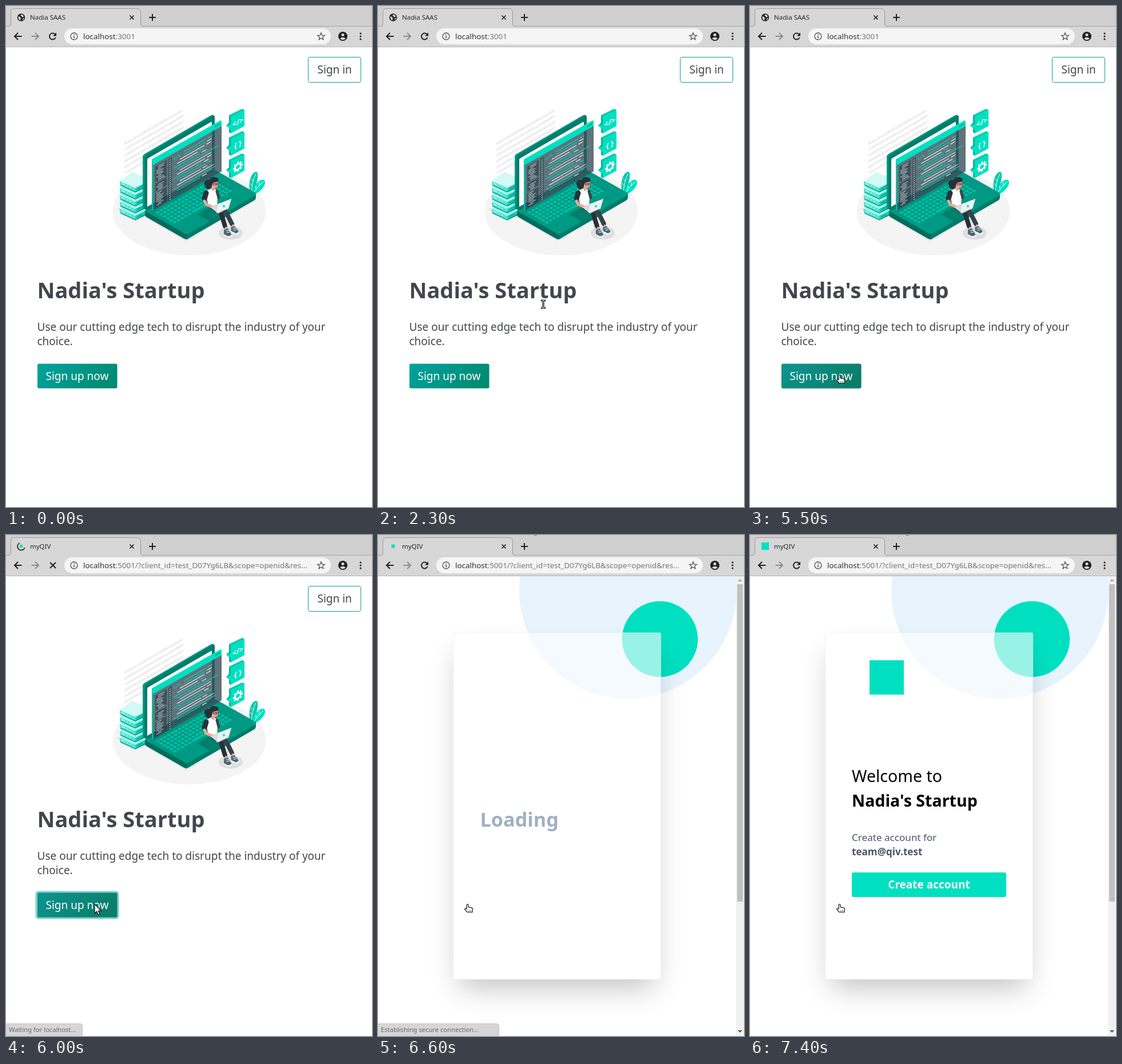
Recreate the animation shown at these times as an HTML page with a canvas. Size 640 by 876 pixels, loop 8000 ms.

```html
<!DOCTYPE html>
<html lang="en">
<head>
<meta charset="utf-8">
<title>Sign up flow</title>
<style>
  html, body { margin: 0; width: 100%; height: 100%; overflow: hidden; background: #fff; }
  canvas { display: block; width: 640px; height: 876px; }
</style>
</head>
<body>
<canvas id="stage" width="640" height="876"></canvas>
<script>
const LOOP = 8000, W = 640, H = 876;
const TEAL = '#00e0c1', INK = '#43464c', FONT = '"Noto Sans", "Open Sans", sans-serif';
const screen2d = document.getElementById('stage').getContext('2d');
let g = screen2d;

// ---------- helpers ----------
function fill(color, path) {
  g.fillStyle = color;
  g.fill(typeof path === 'string' ? new Path2D(path) : path);
}
function line(color, width, d) {
  g.strokeStyle = color;
  g.lineWidth = width;
  g.stroke(new Path2D(d));
}
function rect(color, x, y, w, h) {
  g.fillStyle = color;
  g.fillRect(x, y, w, h);
}
function box(x, y, w, h, r) {
  const p = new Path2D();
  p.roundRect(x, y, w, h, r);
  return p;
}
function oval(color, x, y, rx, ry = rx) {
  const p = new Path2D();
  p.ellipse(x, y, rx, ry, 0, 0, 7);
  fill(color, p);
}
function ring(color, width, x, y, r, from = 0, to = 2 * Math.PI) {
  g.strokeStyle = color;
  g.lineWidth = width;
  g.beginPath();
  g.arc(x, y, r, from, to);
  g.stroke();
}
function text(str, x, y, size, color, weight = 400, align = 'left') {
  g.font = `${weight} ${size}px ${FONT}`;
  g.textAlign = align;
  g.fillStyle = color;
  g.fillText(str, x, y);
  return g.measureText(str).width;
}
function plane(a, b, c, d, x, y, draw) {
  g.save();
  g.transform(a, b, c, d, x, y);
  draw();
  g.restore();
}
function seeded(s) {
  return () => (s = (s * 16807) % 2147483647) / 2147483647;
}

// ---------- illustration ----------
function binaryRows() {
  const rnd = seeded(41);
  for (let row = 0; row < 6; row++) {
    plane(1, -0.577, 0, 1, 207, 243 + row * 10.3, () => {
      let bits = '';
      for (let i = 0; i < 33; i++) bits += rnd() < 0.5 ? '0' : '1';
      g.font = 'italic 5.8px "Liberation Sans", sans-serif';
      g.fillStyle = '#c4c4c4';
      g.fillText(bits, 0, 0);
    });
  }
}

function servers() {
  fill('#e3e3e3', 'M193 355L224 374L246 362V340Z');
  for (let i = 4; i >= 0; i--) {
    plane(1, 0, 0, 1, 0, 306 + i * 12.2, () => {
      fill('#009681', 'M200 4L226 17L247 6V10L226 20L200 8Z');
      fill('#4fe6d3', 'M199 0L226 12V18.5L199 6Z');
      fill('#1ed2ba', 'M226 12L247 1V7L226 18.5Z');
      fill(i ? '#a9f4ea' : '#d3f9f4', 'M199 0L221 -16L247 -4V1L226 12Z');
      line('#fff', 1, 'M202 4L208 6.8M211 8.2L213 9.1M216 10.4L218 11.3');
      line('#007d6c', 1, 'M229 14L239 8.8');
    });
  }
}

function codeWindow() {
  fill('rgba(55,80,90,.8)', 'M257 276L377 208V289L257 358Z');
  fill('#00bfa5', 'M255 268L257.5 270V358L255 356.5Z');
  fill(TEAL, 'M255 268L375 200L377 201V210L257 278Z');
  for (let i = 0; i < 3; i++) oval('#00705f', 367 + i * 3.2, 210.3 - i * 1.85, 1.1);

  const rnd = seeded(97);
  plane(1, -0.57, 0, 1, 257, 278, () => {
    const panel = 'rgba(35,55,65,.55)';
    rect(panel, 4, 5, 20, 27);
    rect(panel, 4, 35, 20, 14);
    rect(panel, 4, 52, 20, 25);
    rect(panel, 27, 5, 6, 73);
    for (let y = 7; y < 76; y += 2.9) {
      if ((y > 31 && y < 36) || (y > 48 && y < 53)) continue;
      rect('#d5e0e2', 6 + (rnd() < 0.3 ? 3 : 0), y, 7 + rnd() * 6, 1);
    }
    for (let y = 8; y < 77; y += 3.6) rect('#b4c3c7', 28.5, y, 3, 1.3);
    g.font = '700 8px "Noto Sans Mono", monospace';
    g.fillStyle = TEAL;
    g.fillText('</>', 35, 13);
    for (let i = 0; i < 14; i++) {
      const y = 7 + i * 4.7, indent = i < 2 ? 54 : 36 + [0, 6, 11, 6][i % 4];
      const len = Math.min(34 + rnd() * 46, 114 - indent);
      rect(i % 4 < 2 ? TEAL : '#ffffff', indent, y, len, 1.2);
      if (indent + len < 100) rect(i % 3 ? '#ffffff' : TEAL, indent + len + 3, y, 8, 1.2);
    }
  });
}

function laptop() {
  fill('#e5e5e5', 'M246 371L314 411L334 403L318 396Z');
  // base
  fill('#006d5d', 'M243 358L316 398V408Q313 408 310 406L247 370Q243 368 243 364Z');
  fill('#007c69', 'M316 398L437 329V335Q437 338 434 340L320 406Q318 408 316 408Z');
  fill('#009a84', 'M243 358L366 287L437 327Q438 329 436 331L319 398Q316 400 313 398Z');
  fill('#008772', 'M259 361L362 302L398 322L295 381Z');
  plane(1, -0.573, 1, 0.573, 259, 361, () => {
    for (let row = 0; row < 6; row++) {
      for (let col = 0; col < 16; col++) {
        if (row === 5 && col > 4 && col < 10) continue;
        rect('#00bda4', 0.6 + col * 6.4, 0.6 + row * 6, 5.2, 4.8);
      }
    }
    rect('#00bda4', 32.6, 30.6, 30.8, 4.8);
  });
  fill('#00806d', 'M334 364L362 348L386 362L358 378Z');
  // lid
  fill('#007d6b', 'M239 264Q239 261 242 259L359 191Q364 189 365 194V289L247 358L239 353Z');
  fill('#009a85', 'M239 264Q239 261 242 259L359 191L361.5 192L245 260Q242 262 242 265V355L239 353Z');
  fill('#ffffff', 'M247 269Q247 267 249 266L358 203Q360 202 360 204V286L247 351Z');
  codeWindow();
}

function bubbles() {
  ['</>', '{ }', ''].forEach((label, i) => plane(1, 0, 0, 1, 0, i * 39, () => {
    fill('#00b59b', 'M390 191L413 180L417 182L393 194V223L390 221V213L385 209L390 204Z');
    fill('#00cdb1', 'M390 191L413 180L417 182L393 194Z');
    fill(TEAL, 'M393 194L417 182V210L393 223V216L386 210L393 206Z');
    plane(1, -0.52, 0, 1, 405.5, 203, () => {
      if (label) {
        text(label, 0, 4.5, 12.5, '#fff', 700, 'center');
        return;
      }
      ring('#fff', 3, 0, 0, 5);
      for (let k = 0; k < 8; k++) {
        g.save();
        g.rotate(k * Math.PI / 4);
        rect('#fff', -1.5, -8.6, 3, 3.4);
        g.restore();
      }
    });
  }));
}

function plant() {
  fill('#00c9ab', 'M427 326C423 311 427 294 436 290C443 288 441 306 432 327Z');
  fill(TEAL, 'M430 329C433 313 443 302 451 304C457 309 449 323 434 330Z');
  line('#fff', 0.9, 'M429 325Q431 306 437 293M427 310L431 315M429 302L433 307M432 328Q440 315 450 307M437 314L437 320M443 308L443 315');
}

function girl() {
  const dark = '#263238', skin = '#f2a493';
  oval('#dedede', 393, 397, 21, 11.5);
  // legs
  g.lineCap = g.lineJoin = 'round';
  line(dark, 8, 'M361 352L376 362L383 385');
  line('#34434b', 8, 'M367 350L385 361L395 381');
  line(skin, 4, 'M385 388L386 392M397 384L398 387');
  fill('#4a6977', 'M381 391L388 389L394 399Q394 404 388 403L381 399Z');
  fill('#4a6977', 'M393 387L400 385L406 393Q408 398 402 398L394 394Z');
  line('#fff', 2, 'M381 400L388 404L394 402M394 395L402 399L407 396');
  line('#fff', 1, 'M385 393L390 392M386 396L391 395M397 389L402 388M398 392L403 391');
  // body
  fill('#ffffff', 'M352 322Q360 317 367 321Q371 328 369 348L355 351Q350 339 352 322Z');
  line(dark, 9, 'M350 327L347 337');
  line(skin, 5, 'M347 341L350 347L365 353');
  line('#37474f', 5, 'M369 324L372 335');
  // hair and head
  fill(dark, 'M357 304C349 302 344 309 348 314C349 319 354 323 357 319Z');
  line(skin, 5, 'M362 315L362 321');
  oval(skin, 365, 311, 6.5, 8);
  fill(dark, 'M356 318C353 306 356 299 363 299C370 299 373 303 371 307C366 309 363 307 361 311L359 318Z');
  line(dark, 0.9, 'M363 310H367V313H363ZM368.5 310H371.5V313H368.5Z');
  line('#d8516a', 1, 'M366 317L369 316.5');
  g.lineCap = 'butt';
  g.lineJoin = 'miter';
  // small computer
  fill('#d5dada', 'M357 352L372 345L386 355L371 363Z');
  fill('#eef1f1', 'M371 346L394 337L389 354L368 362Z');
  line('#c4cccc', 0.8, 'M368 362L389 354L394 337');
  oval(TEAL, 381, 350, 2);
}

function buildArt() {
  const art = document.createElement('canvas');
  art.width = W;
  art.height = H;
  g = art.getContext('2d');
  oval('#f4f4f4', 320.5, 359, 134, 77);
  binaryRows();
  servers();
  plant();
  laptop();
  bubbles();
  girl();
  g = screen2d;
  return art;
}
const art = buildArt();

// ---------- browser frame ----------
function favicon(t) {
  if (t < 5900) {
    oval('#26292d', 26.5, 20, 6.8);
    fill('#d8d8d8', 'M21 18L25 19.5L26 23L24 25L22 22ZM27 14.5L31 17L30 20L27.5 18.5L25.5 16.5ZM29 22L32 21L30 25Z');
  } else if (t < 6600) {
    const a = t < 6200 ? -0.2 : 0.1;
    ring('#3b3f44', 2, 26.5, 20, 6.5, a + 0.5, a + 4.5);
    if (t >= 6000) rect(TEAL, 24, 17, 5, 5);
  } else if (t < 7000) rect(TEAL, 23.5, 16.5, 6, 6);
  else rect(TEAL, 20, 13, 13, 13);
}

function chrome(t) {
  const dark = '#202124';
  rect('#d0d0d0', 0, 0, W, 36);
  rect('#d7d7d7', 0, 36, W, 36);
  rect('#a3a3a3', 0, 35, W, 1);
  rect('#b4b4b4', 0, 71, W, 1);
  const tab = 'M0 35.5H4Q8.5 35.5 8.5 31V11Q8.5 4.5 15 4.5H228Q235.5 4.5 235.5 11V31Q235.5 35.5 240 35.5';
  fill('#d7d7d7', tab + 'V37H0Z');
  line('#999', 1, tab);
  if (t >= 6400) rect('#777', 273, 0, 5, 1);

  favicon(t);
  text(t < 6000 ? 'Nadia SAAS' : 'myQIV', 42, 24, 11.5, '#26282b');
  line(dark, 1.7, 'M216.5 16.5L223.5 23.5M223.5 16.5L216.5 23.5');
  line(dark, 2, 'M250 20H262M256 14V26');

  line(dark, 2, 'M27.5 53H15M21 47L15 53L21 59');
  line('#8b8b8b', 2, 'M44.5 53H57M51 47L57 53L51 59');
  if (t >= 5900 && t < 6600) {
    line(dark, 2, 'M77 48L87 58M87 48L77 58');
  } else {
    ring(dark, 2, 81.5, 53, 5.5, 0.4, 5.5);
    fill(dark, 'M88 46.5V52.5H82Z');
  }

  fill('#f5f5f5', box(102, 39, 466, 28, 14));
  ring('#55585c', 1.4, 119, 53, 6);
  rect('#55585c', 118.2, 52, 1.6, 4.5);
  rect('#55585c', 118.2, 49.3, 1.6, 1.6);
  const w = text('localhost', 135, 58, 13.4, '#2d2f32');
  const rest = t < 6000 ? ':3001' : ':5001/?client_id=test_D07Yg6LB&scope=openid&res...';
  text(rest, 135 + w, 58, 13.4, '#737578');

  let star = '';
  for (let i = 0; i < 10; i++) {
    const r = i % 2 ? 2.8 : 6.6, a = i * Math.PI / 5 - Math.PI / 2;
    star += (i ? 'L' : 'M') + (551 + r * Math.cos(a)) + ' ' + (53.5 + r * Math.sin(a));
  }
  line('#4c4f53', 1.3, star + 'Z');
  oval(dark, 589, 53, 8);
  oval('#d7d7d7', 589, 50.5, 2.5);
  fill('#d7d7d7', 'M584 57Q589 52.5 594 57Q589 61.5 584 57Z');
  for (let y = 48; y <= 58; y += 5) oval(dark, 620, y, 1.6);
}

function statusBar(t) {
  if (t < 5700 || t >= 7200) return;
  const early = t < 6400, w = early ? 134 : 212;
  const p = box(-2, 854.5, w + 1.5, 24, 4);
  fill('#d6d6d6', p);
  g.strokeStyle = '#c4c4c4';
  g.lineWidth = 1;
  g.stroke(p);
  text(early ? 'Waiting for localhost...' : 'Establishing secure connection...', 5, 869, 11.2, '#666');
}

// ---------- pages ----------
function landing(t) {
  g.drawImage(art, 0, 0);
  g.strokeStyle = '#0f9d8c';
  g.lineWidth = 1;
  g.stroke(box(528.5, 89.5, 92, 44, 3));
  text('Sign in', 544.5, 118, 19, INK);
  text("Nadia's Startup", 54.5, 511, 38, INK, 700);
  text('Use our cutting edge tech to disrupt the industry of your', 54.5, 568, 19, INK);
  text('choice.', 54.5, 593, 19, INK);

  const hover = t >= 5500, button = box(55, 625.6, 139.5, 42.8, 3);
  if (t >= 5900) fill('#7ed2cf', box(51.5, 622.5, 146, 49, 5));
  const shade = g.createLinearGradient(79, 602, 170, 692);
  shade.addColorStop(0, hover ? '#0d9490' : '#00a3a0');
  shade.addColorStop(1, hover ? '#0b7b65' : '#00886b');
  g.save();
  if (hover && t < 5900) {
    g.shadowColor = 'rgba(0,0,0,.18)';
    g.shadowBlur = 3;
    g.shadowOffsetY = 1;
  }
  fill(shade, button);
  g.restore();
  text('Sign up now', 69.5, 654, 19, '#fff');
}

function card() {
  const p = box(131.5, 171, 363, 606, 2);
  const outside = new Path2D('M0 72H626V876H0Z');
  outside.addPath(p);
  g.save();
  g.clip(outside, 'evenodd');
  g.shadowColor = 'rgba(0,0,0,.25)';
  g.shadowBlur = 50;
  g.shadowOffsetY = 25;
  fill('#000', box(143.5, 183, 339, 582, 2));
  g.restore();
  fill('rgba(255,255,255,.6)', p);
  g.strokeStyle = 'rgba(235,238,240,.7)';
  g.lineWidth = 1;
  g.stroke(p);
}

function account(t) {
  g.save();
  g.clip(new Path2D('M0 72H626V876H0Z'));
  oval('#e7f4fe', 437, 96.5, 190);
  oval(TEAL, 493, 182, 66.3);
  g.restore();
  card();

  if (t < 6700) {
    text('Loading', 178.5, 510, 34.2, '#9fb0c3', 700);
  } else {
    if (t >= 6900) rect(TEAL, 209, 219, 60, 60);
    text('Welcome to', 178, 432, 28.5, '#000');
    text("Nadia's Startup", 178, 475, 28.5, '#000', 700);
    text('Create account for', 178, 535, 17.1, '#4a5568');
    text('team@qiv.test', 178, 560, 17.1, '#4a5568', 700);
    fill(TEAL, box(178, 590, 270, 43, 3));
    text('Create account', 313, 618, 19, '#fff', 700, 'center');
  }

  rect('#f1f1f1', 626, 72, 14, 804);
  rect('#c1c1c1', 628, 86, 10, 555);
  fill('#a3a3a3', 'M629 81L633 77L637 81Z');
  fill('#505050', 'M629 866L633 870L637 866Z');
}

// ---------- pointer ----------
// time, x, y, shape
const moves = [
  [900, 17, 547, 'arrow'], [1000, 24, 546, 'arrow'], [1100, 36, 543, 'arrow'],
  [1200, 52, 540, 'arrow'], [1300, 72, 536, 'arrow'], [1400, 94, 532, 'arrow'],
  [1500, 117, 528, 'arrow'], [1600, 140, 524, 'arrow'], [1700, 162, 526, 'arrow'],
  [1800, 186, 522, 'beam'], [1900, 214, 520, 'beam'], [2000, 240, 520, 'beam'],
  [2100, 262, 520, 'beam'], [2200, 280, 521, 'beam'], [2300, 289, 521.5, 'beam'],
  [3000, 288, 525, 'arrow'], [3100, 260, 525, 'arrow'],
  [3300, 246, 530, 'arrow'], [3400, 230, 545, 'arrow'], [3500, 224, 562, 'beam'],
  [3600, 232, 577, 'arrow'], [3800, 252, 577.5, 'arrow'], [4000, 252.5, 579, 'arrow'],
  [5100, 222, 597, 'arrow'], [5200, 183, 618, 'arrow'], [5300, 152, 633, 'arrow'],
  [5500, 150, 644, 'hand'], [5900, 155, 645.5, 'arrow'], [6600, 150, 644, 'hand']
];
const shapes = {
  arrow: 'M0 0V16L3.6 12.6L6.2 18.4L9 17.2L6.4 11.6H11.4Z',
  beam: 'M-3.5 -7.5H3.5V-5.5H1V5.5H3.5V7.5H-3.5V5.5H-1V-5.5H-3.5Z',
  hand: 'M5 9.5V3Q5 1.5 6.5 1.5Q8 1.5 8 3V6.5L14 7.8Q15.8 8.3 15.6 10.5L15 15.5H6L2 11Q1.2 9.2 2.6 8.8Q3.8 8.6 5 9.8Z'
};
function pointer(t) {
  const now = moves.findLast(m => m[0] <= t);
  if (!now) return;
  const [, x, y, kind] = now;
  plane(1, 0, 0, 1, x, y, () => {
    fill('#fff', shapes[kind]);
    line('#111', 1.2, shapes[kind]);
    if (kind === 'hand') line('#111', 0.9, 'M8.5 12.5V14M10.5 12.5V14M12.5 12.5V14');
  });
}

// ---------- loop ----------
const start = performance.now();
function frame() {
  const t = (performance.now() - start) % LOOP;
  rect('#fff', 0, 0, W, H);
  (t < 6600 ? landing : account)(t);
  chrome(t);
  statusBar(t);
  pointer(t);
  requestAnimationFrame(frame);
}
frame();
</script>
</body>
</html>
```
